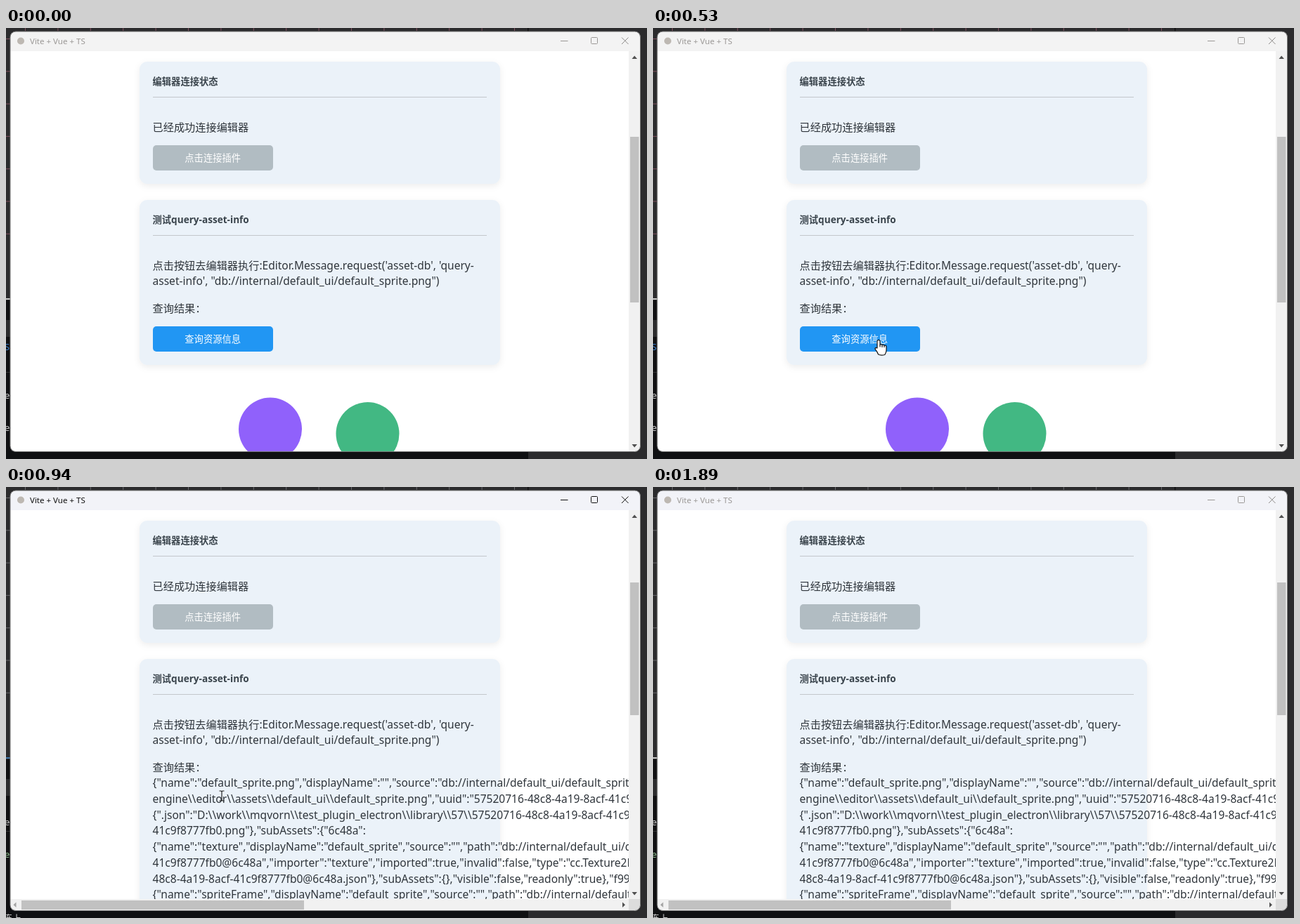
These frames come from a looping animation (912 px wide and 614 px high, 1960 ms). An HTML page:

```html
<!DOCTYPE html>
<html lang="zh-CN">
<head>
<meta charset="utf-8">
<title>Vite + Vue + TS</title>
<style>
html, body { margin: 0; width: 100%; height: 100%; overflow: hidden; background: #2b2b2d; }
svg { display: block; width: 912px; height: 614px; }
text { font-family: "Noto Sans CJK SC", "Noto Sans CJK", sans-serif; font-size: 15.2px; fill: #2f353b; white-space: pre; }
.latin { font-family: "Noto Sans", "Noto Sans CJK SC", sans-serif; font-size: 15.55px; }
.head { font-size: 13.3px; font-weight: 700; fill: #3a444c; }
.head .latin { font-size: 13.6px; }
.btn { font-size: 13.3px; font-weight: 500; fill: #fff; text-anchor: middle; }
.title { font-size: 11.5px; fill: inherit; }
.card { fill: #ebf2f9; filter: drop-shadow(0 3px 5px rgba(0, 0, 0, .07)); }
.rule { fill: #c3c7cb; }
.track { fill: #f1f1f1; }
.thumb { fill: #c1c1c1; }
.arrow { fill: #505050; }
.log { font-size: 13px; fill: #d0d0d0; }
.pressed { filter: drop-shadow(0 2px 3px rgba(33, 150, 243, .25)); }
</style>
</head>
<body>
<svg viewBox="0 0 912 614">
  <defs>
    <clipPath id="frame"><rect x="6" y="5" width="896.5" height="598.5" rx="8"/></clipPath>
    <clipPath id="view"><rect x="6" y="33" width="880" height="554"/></clipPath>
  </defs>

  <rect width="912" height="614" fill="#2b2b2d"/>
  <rect y="388" width="8" height="226" fill="#101012"/>
  <rect y="603" width="743" height="11" fill="#0f1012"/>
  <rect x="742" width="1.5" height="5" fill="#111"/>
  <g id="grid"></g>
  <rect id="splitter" y="385" width="6" height="2"/>
  <rect y="416" width="6" height="24" fill="#2b2b2d"/>
  <rect y="490" width="6" height="1" fill="#333"/>
  <g id="logBefore">
    <text class="latin log" x="-2" y="459" style="fill:#3b82d0">S</text>
    <text class="latin log" x="-2" y="528">e</text>
    <text class="latin log" x="-2" y="574">e</text>
  </g>
  <g id="logAfter">
    <text class="latin log" x="-2" y="482">e</text>
    <text class="latin log" x="-2" y="528" style="fill:#8fbf8f">e</text>
    <text class="log" x="-4" y="619">连上</text>
  </g>

  <g clip-path="url(#frame)">
    <rect x="6" y="5" width="897" height="599" fill="#fff"/>
    <rect id="titleBar" x="6" y="5" width="897" height="28"/>
    <circle cx="21" cy="18.5" r="5" fill="#bdb8b2"/>
    <g id="caption">
      <text class="latin title" x="34" y="22.5">Vite + Vue + TS</text>
    </g>
    <g id="controls" fill="none">
      <path d="M789 18.5H799.5"/>
      <rect x="832.5" y="13.5" width="9" height="9" rx="1"/>
    </g>
    <path id="close" d="M876 13.5L885.5 23M885.5 13.5L876 23" fill="none"/>

    <rect class="card" x="190" y="48" width="513" height="174" rx="11"/>
    <text class="head" x="208.5" y="81">编辑器连接状态</text>
    <rect class="rule" x="209" y="98" width="475" height="1"/>
    <text x="208.5" y="146.5">已经成功连接编辑器</text>
    <rect x="209" y="167" width="171" height="36" rx="5" fill="#b1bcc2"/>
    <text class="btn" x="294.2" y="190">点击连接插件</text>

    <g clip-path="url(#view)" id="page">
      <rect class="card" id="card" x="190" y="245" width="513" height="235" rx="11"/>
      <text class="head" x="208.5" y="278">测试<tspan class="latin">query-asset-info</tspan></text>
      <rect class="rule" x="209" y="295" width="475" height="1"/>
      <text x="208.5" y="343.5">点击按钮去编辑器执行<tspan class="latin">:Editor.Message.request('asset-db', 'query-</tspan></text>
      <text class="latin" x="208.5" y="366">asset-info', "db://internal/default_ui/default_sprite.png")</text>
      <text x="208.5" y="404.5">查询结果：</text>
      <g id="result"></g>
    </g>

    <g id="idle">
      <rect id="button"/>
      <text class="btn" id="buttonText" x="294.2" y="448">查询资源信息</text>
      <circle cx="376" cy="571.5" r="45" fill="#9061fb"/>
      <circle cx="514.5" cy="578" r="45" fill="#42b883"/>
    </g>

    <rect class="track" x="886" y="33" width="17" height="571"/>
    <rect class="thumb" id="vThumb" x="888" width="12.5"/>
    <path class="arrow" d="M890.5 44L894.2 39.5L898 44Z"/>
    <path class="arrow" id="vDown" d="M890.5 -2L894.2 2.5L898 -2Z"/>
    <g id="hBar">
      <rect class="track" x="6" y="587" width="880" height="17"/>
      <rect x="886" y="587" width="17" height="17" fill="#dcdcdc"/>
      <rect class="thumb" x="22" y="589" width="402" height="13"/>
      <path d="M14.5 591.5L10.5 595.3L14.5 599Z" fill="#a3a3a3"/>
      <path class="arrow" d="M877 591.5L881 595.3L877 599Z"/>
    </g>
  </g>
  <rect x="6" y="5" width="896.5" height="598.5" rx="8" fill="none" stroke="#777"/>

  <circle id="click" cx="304" cy="440" fill="#ffe600" fill-opacity=".55"/>
  <g id="cursor">
    <g id="hand" fill="#fff" stroke="#111" stroke-width="1.2" stroke-linejoin="round">
      <path d="M-2 12V1.8Q0 -1 2 1.8V7Q3.6 6 5 7.4Q6.6 6.6 8 8.2Q10.8 7.6 11 10V15Q11 18 8.8 21.5Q3 22.8 -.4 21Q-2 17 -5 13.4Q-5.2 10.6 -2 12Z"/>
      <path d="M2 7V10.5M5 7.4V11M8 8.2V11" fill="none"/>
    </g>
    <path id="pointer" d="M0 0V15.5L3.6 12.2L6 18L8.6 16.9L6.2 11.3H11Z" fill="#fff" stroke="#111"/>
    <path id="beam" d="M-3.5 -7H-1L0 -6L1 -7H3.5M0 -6V6M-3.5 7H-1L0 6L1 7H3.5" fill="none" stroke="#222" stroke-width="1.2"/>
  </g>
</svg>

<script>
const LOOP = 1960;
const ACTIVATED = 740, ANSWERED = 940, CLOSE_DIMMED = 1080, DEACTIVATED = 1890;
const $ = id => document.getElementById(id);
const set = (id, attrs) => Object.entries(attrs).forEach(([k, v]) => $(id).setAttribute(k, v));
const show = (id, on) => { $(id).style.display = on ? '' : 'none'; };

// start time, cursor shape, hotspot x, hotspot y
const cursorSteps = [
  [0, '', 0, 0],
  [70, 'pointer', 668, 585],
  [140, 'pointer', 610, 562],
  [200, 'hand', 546, 530],
  [260, 'hand', 482, 498],
  [330, 'pointer', 420, 473],
  [400, 'hand', 372, 457],
  [460, 'hand', 340, 448],
  [530, 'hand', 321, 444],
  [600, 'hand', 311, 441],
  [670, 'hand', 306, 440],
  [740, 'hand', 304, 440],
  [940, 'beam', 307, 440],
  [1210, 'beam', 400, 476],
  [1280, 'beam', 562, 534],
  [1350, 'beam', 704, 588],
  [1420, 'pointer', 746, 600],
  [1490, '', 0, 0],
];

// start time, radius of the click highlight
const clickSteps = [[0, 0], [670, 5], [740, 9], [810, 11.5], [940, 0]];

const restingButton = { x: 209, y: 425, width: 171, height: 36, rx: 5, fill: '#2196f3', stroke: 'none', class: '' };
const pressedButton = { x: 208.5, y: 424, width: 172, height: 37, rx: 3, fill: '#1e88e5', stroke: '#fff', 'stroke-width': 3, class: 'pressed' };

const answer = [
  '{"name":"default_sprite.png","displayName":"","source":"db://internal/default_ui/default_sprite.png",',
  'engine\\\\editor\\\\assets\\\\default_ui\\\\default_sprite.png","uuid":"57520716-48c8-4a19-8acf-41c9f8777fb0",',
  '{".json":"D:\\\\work\\\\mqvorn\\\\test_plugin_electron\\\\library\\\\57\\\\57520716-48c8-4a19-8acf-41c9f8777fb0',
  '41c9f8777fb0.png"},"subAssets":{"6c48a":',
  '{"name":"texture","displayName":"default_sprite","source":"","path":"db://internal/default_ui/default_sprite',
  '41c9f8777fb0@6c48a","importer":"texture","imported":true,"invalid":false,"type":"cc.Texture2D",',
  '48c8-4a19-8acf-41c9f8777fb0@6c48a.json"},"subAssets":{},"visible":false,"readonly":true},"f9941":',
  '{"name":"spriteFrame","displayName":"default_sprite","source":"","path":"db://internal/default_ui',
];

function addSvg(parent, tag, attrs, text = '') {
  const node = document.createElementNS($('page').namespaceURI, tag);
  Object.entries(attrs).forEach(([k, v]) => node.setAttribute(k, v));
  node.textContent = text;
  $(parent).append(node);
}

answer.forEach((line, i) =>
  addSvg('result', 'text', { class: 'latin', x: 208.5, y: 427 + i * 22.75 }, line));
for (let i = 0; i < 16; i++)
  addSvg('grid', 'rect', { x: 27 + i * 46.4, y: 0, width: 1, height: 4 });
for (let i = 0; i < 7; i++)
  addSvg('grid', 'rect', { x: 0, y: 15 + i * 46.3, width: 6, height: 1 });

const stepAt = (steps, t) => steps.findLast(s => s[0] <= t);

function draw(t) {
  const active = t >= ACTIVATED && t < DEACTIVATED;
  const clicked = t >= ACTIVATED;
  const answered = t >= ANSWERED;
  const ink = active ? '#111' : '#9b9896';

  set('titleBar', { fill: clicked ? '#f2f3f8' : '#f3f3f3' });
  set('caption', { fill: ink });
  set('controls', { stroke: ink });
  set('close', { stroke: active && t < CLOSE_DIMMED ? '#111' : '#8c8a88' });
  set('grid', { fill: clicked ? '#68686b' : '#80505f' });
  set('splitter', { fill: active ? '#3f78ad' : '#c8c8c8' });

  set('button', clicked ? pressedButton : restingButton);
  set('buttonText', { y: clicked ? 447 : 448 });

  set('card', { height: answered ? 420 : 235 });
  set('vThumb', { y: answered ? 136 : 155, height: answered ? 189 : 236 });
  set('vDown', { transform: `translate(0 ${answered ? 579 : 595})` });
  show('result', answered);
  show('hBar', answered);
  show('logAfter', answered);
  show('logBefore', !answered);
  show('idle', !answered);

  set('click', { r: stepAt(clickSteps, t)[1] });
  const [, shape, x, y] = stepAt(cursorSteps, t);
  ['hand', 'pointer', 'beam'].forEach(id => show(id, id === shape));
  set('cursor', { transform: `translate(${x} ${y})` });
}

const start = performance.now();
function tick() {
  draw((performance.now() - start) % LOOP);
  requestAnimationFrame(tick);
}
tick();
</script>
</body>
</html>
```
